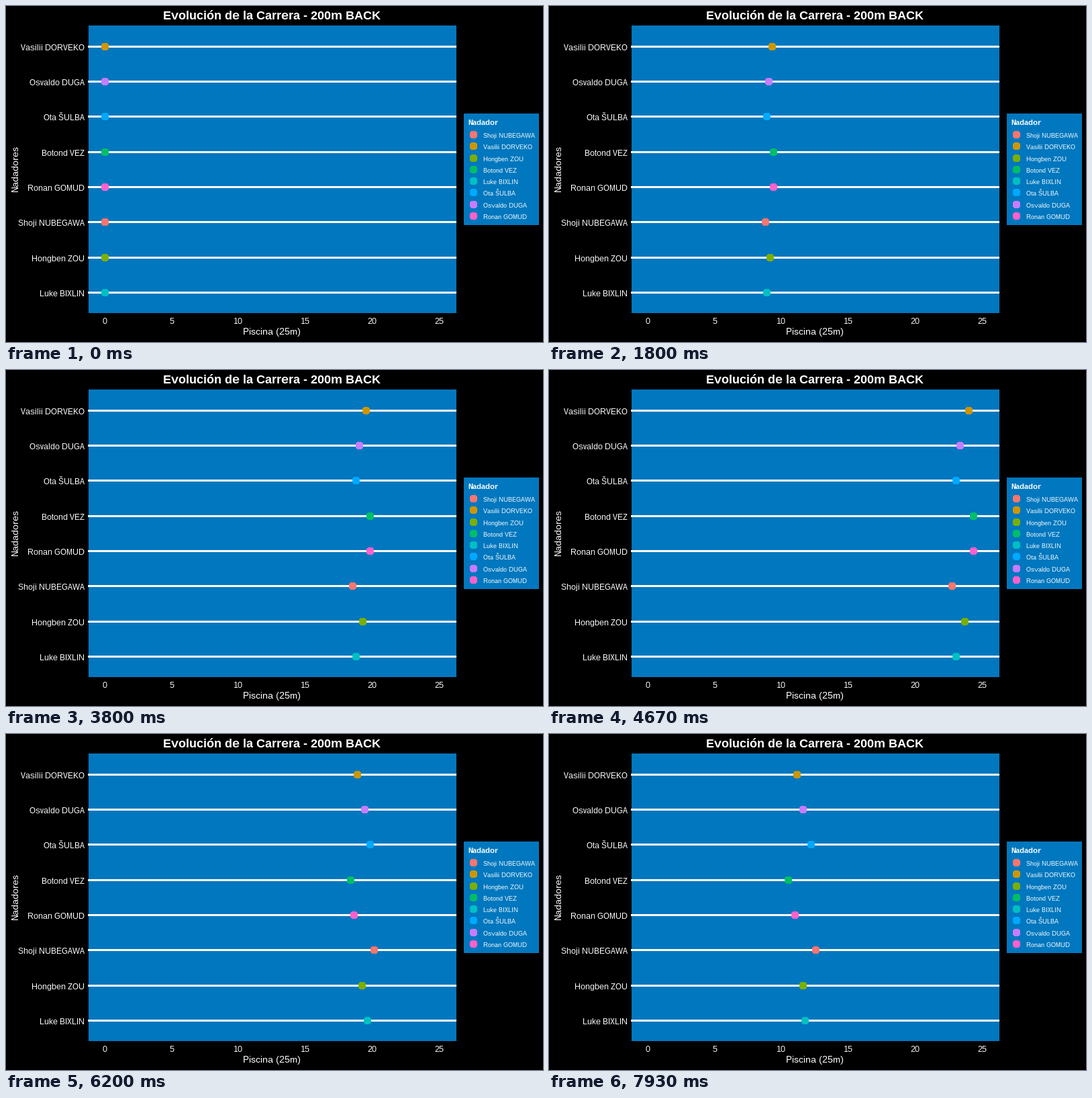
Recreate the animation shown at these times as a matplotlib script. Size 800 by 500 pixels, loop 8000 ms.

```python
import math

import matplotlib.pyplot as plt
from matplotlib.animation import FuncAnimation
from matplotlib.patches import Circle, Rectangle

W, H, DPI = 800, 500, 100
FRAMES, LOOP_MS = 120, 8000
POOL = "#0077BE"
X0, X25 = 147.9, 646.1          # pixel positions of 0 m and 25 m
ROW0, ROW_STEP = 60.4, 52.286

# name, colour, frames for the first length, frames for the second, legend slot
SWIMMERS = [
    ("Vasilii DORVEKO", "#CD9600", 73, 81, 1),
    ("Osvaldo DUGA", "#C77CFF", 75, 80, 6),
    ("Ota ŠULBA", "#00A9FF", 76, 82, 5),
    ("Botond VEZ", "#00BE67", 72, 79, 3),
    ("Ronan GOMUD", "#FF61CC", 72, 82, 7),
    ("Shoji NUBEGAWA", "#F8766D", 77, 82, 0),
    ("Hongben ZOU", "#7CAE00", 74, 82, 2),
    ("Luke BIXLIN", "#00BFC4", 76, 79, 4),
]

plt.rcParams.update({
    "font.family": "Liberation Sans",
    "text.hinting": "native",
    "text.hinting_factor": 1,
    "text.kerning_factor": 6,
})

fig = plt.figure(figsize=(W / DPI, H / DPI), dpi=DPI, facecolor="black")
ax = fig.add_axes([0, 0, 1, 1])
ax.set_xlim(0, W)
ax.set_ylim(H, 0)
ax.axis("off")


def snap(v):
    return math.floor(v) + 0.5


def rect(x0, y0, x1, y1, color):
    ax.add_patch(Rectangle((x0, y0), x1 - x0, y1 - y0, fc=color, lw=0,
                           antialiased=False))


def dot(x, y, color):
    return ax.add_patch(Circle((snap(x), snap(y)), 5.5, fc=color, lw=0,
                               antialiased=False, zorder=3))


def label(x, y, text, px, **kw):
    ax.text(x, y, text, fontsize=px * 72 / DPI, color="white",
            va="baseline", **kw)


def pool_x(metres):
    return X0 + (X25 - X0) * metres / 25


def metres_at(frame, out, back):
    if frame <= out:
        return 25 * frame / out
    return 25 * (1 - (frame - out) / back)


rect(123, 29, 671, 457, POOL)
rect(682, 160, 794, 326, POOL)

label(396, 20, "Evolución de la Carrera - 200m BACK", 18.2,
      ha="center", weight="bold")
label(396, 489, "Piscina (25m)", 14, ha="center")
label(18, 242, "Nadadores", 14, ha="center", rotation=90,
      rotation_mode="anchor")
label(688, 177, "Nadador", 11, ha="left", weight="bold")
for m in range(0, 26, 5):
    label(pool_x(m) - 1, 473, str(m), 12, ha="center")

dots = []
for i, (name, color, out, back, slot) in enumerate(SWIMMERS):
    y = snap(ROW0 + ROW_STEP * i)
    rect(122, y - 1.5, 671, y + 1.5, "white")
    label(117, y + 5.5, name, 12, ha="right")
    dots.append(dot(X0, y, color))

    key_y = 191.5 + 17.28 * slot
    dot(696.5, key_y, color)
    label(711, snap(key_y) + 4.5, name, 9.3, ha="left")


def update(frame):
    for d, (_, _, out, back, _) in zip(dots, SWIMMERS):
        d.center = (snap(pool_x(metres_at(frame, out, back))), d.center[1])
    return dots


anim = FuncAnimation(fig, update, frames=FRAMES, interval=LOOP_MS / FRAMES,
                     init_func=lambda: update(0), repeat=True,
                     repeat_delay=0, blit=False)
plt.show()
```
